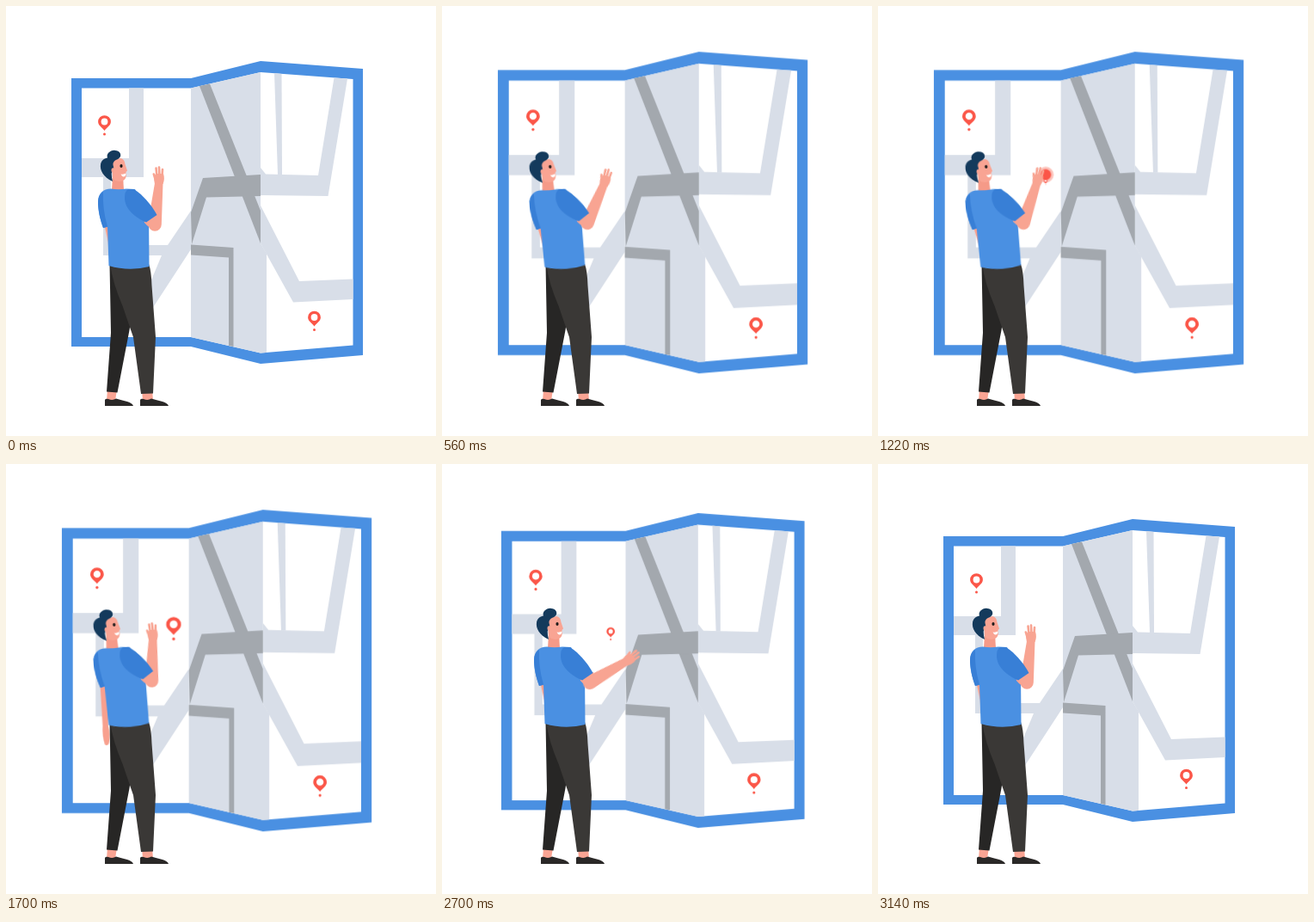
These frames come from a looping animation (500 px wide and 500 px high, 3200 ms). An HTML page:

```html
<!DOCTYPE html>
<html lang="en">
<head>
<meta charset="utf-8">
<title>Map pins</title>
<style>
  html, body { margin: 0; width: 100%; height: 100%; overflow: hidden; background: #fff; }
  svg { display: block; width: 100vw; height: 100vh; }

  /* one loop = 3200 ms, so 1% = 32 ms */
  .map, .lean, .arm, .back-arm, .eye, .halo, .disc, .drop {
    animation: 3200ms ease-in-out infinite;
  }
  .map { animation-name: zoom; transform-origin: 253px 236px; }
  .lean { animation-name: lean; transform-origin: 143px 305px; }
  .arm { animation-name: reach; transform-origin: 172px 253px; }
  .back-arm { animation-name: swing; transform-origin: 117px 248px; }
  .eye { animation-name: blink; transform-origin: 134px 186px; }
  .halo { animation-name: halo; transform-origin: 198.4px 198.4px; }
  .disc { animation-name: disc; transform-origin: 198.4px 198.4px; }
  .drop { animation-name: drop; transform-origin: 198.3px 205.3px; }

  @keyframes zoom {
    0%, 5% { transform: scale(1); }
    12.5%, 82.2% { transform: scale(1.0625); }
    87.5%, 100% { transform: scale(1); }
  }
  @keyframes lean {
    0%, 5% { transform: rotate(0); }
    15%, 72.2% { transform: rotate(-4deg); }
    82%, 100% { transform: rotate(0); }
  }
  @keyframes reach {
    0%, 7% { transform: rotate(0); }
    17.5%, 21.25% { transform: rotate(21.5deg); }
    28.125% { transform: rotate(0); }
    34.375% { transform: rotate(24deg); animation-timing-function: ease-in; }
    38.125% { transform: rotate(17deg); animation-timing-function: ease-out; }
    47%, 55.6% { transform: rotate(0); }
    69%, 89.5% { transform: rotate(54deg); }
    98.1%, 100% { transform: rotate(0); }
  }
  @keyframes swing {
    0%, 21.25% { transform: rotate(-13deg); }
    28.125% { transform: rotate(0); }
    34.375%, 38.75% { transform: rotate(-13deg); }
    47%, 55.6% { transform: rotate(0); }
    66%, 100% { transform: rotate(-13deg); }
  }
  @keyframes blink {
    0%, 70% { transform: scaleY(1); }
    71.5%, 72.2% { transform: scaleY(.2); }
    73.8%, 100% { transform: scaleY(1); }
  }
  @keyframes halo {
    0%, 30.5% { transform: scale(0); }
    35% { transform: scale(1); }
    38.125% { transform: scale(.58); }
    40.5%, 100% { transform: scale(0); }
  }
  @keyframes disc {
    0%, 30.5% { transform: scale(0); }
    35% { transform: scale(1); }
    38.125% { transform: scale(.74); }
    40.5%, 100% { transform: scale(0); }
  }
  @keyframes drop {
    0%, 37.2% { transform: translateY(4px) scale(0); }
    38.125% { transform: translateY(4px) scale(.25); }
    43.5% { transform: scale(1.3); }
    48% { transform: scale(.95); }
    51%, 82.2% { transform: scale(1); }
    87%, 100% { transform: scale(0); }
  }
</style>
</head>
<body>
<svg viewBox="0 0 500 500">
  <defs>
    <g id="pin">
      <path fill="#fb5648" d="M0-4C-3-8-7.4-10-7.4-14.4A7.4 7.4 0 0 1 7.4-14.4C7.4-10 3-8 0-4Z"/>
      <circle cy="-14.5" r="3.9" fill="#fff"/>
      <circle r="1.5" fill="#fb5648"/>
    </g>
    <path id="shoe" fill="#2a2827" d="M115 465V458Q116 456 119 457Q124 459 128 456.500Q134 458 141 460Q147 462 148 465Z"/>
  </defs>

  <g class="map">
    <path fill="#4a90e2" d="M76 84H215L296 64L415 73V406L296 416L215 396H76Z"/>
    <path fill="#fff" d="M88 95.500H215L296 77L403.500 85V394.500L296 403.500L215 385H88Z"/>
    <!-- roads and folded panel -->
    <g fill="#d8dee8">
      <path d="M215 95.500L296 77V276L303 288V403L296 403.500L215 385Z"/>
      <path d="M143 95.500H160V199H122V278H188L215 238V283L170 352L160 340L181 290H113V199H88V177H143Z"/>
      <path d="M312 78L320.500 79L321 196H316Z"/>
      <path d="M296 188L302 195.500L363 197L381.500 83.500L397 84.500L374.500 221L296 220Z"/>
      <path d="M296 232L341 320L403.500 317.500V341L334 344.500L296 276Z"/>
    </g>
    <g fill="#a3a8ae">
      <path d="M225 93L237 90.500L296 238V276Z"/>
      <path d="M229 200L296 196V221L233 222.500L216 277L215 240Z"/>
      <path d="M215 277.500L264.500 281V396L259 395V292.500L215 289.500Z"/>
    </g>
    <use href="#pin" x="114.500" y="149"/>
    <use href="#pin" x="358.500" y="376.500"/>
    <circle class="halo" cx="198.400" cy="198.400" r="15" fill="#fcc3bb"/>
    <circle class="disc" cx="198.400" cy="198.400" r="8" fill="#fb5648"/>
    <g class="drop"><use href="#pin" transform="translate(198.300 205.300) scale(1.100)"/></g>
  </g>

  <g class="lean">
    <path class="back-arm" fill="#f8a08e" d="M113 240H121L120.500 290L119 303Q121 312 118.500 323Q116 327 113.500 324Q111 314 112.500 303Z"/>
  </g>

  <!-- legs -->
  <path fill="#f9a493" d="M118 446H129L127 459H117ZM158 446H170L171 459H159Z"/>
  <use href="#shoe"/>
  <use href="#shoe" x="41"/>
  <path fill="#272625" d="M120.500 300L122 380L117 448.500L129.500 449.500L143.500 377L150 330Z"/>
  <path fill="#3a3836" d="M121 300H166Q169 308 169.500 325L174 385L171 450.500L157 451L148 385Q142 368 136 350Q124 322 121 300Z"/>

  <g class="lean">
    <!-- neck and shirt -->
    <path fill="#f59a88" d="M124 197H136L137 214Q130 218 123 214Z"/>
    <path fill="#4a90e2" d="M122 212.500Q131 214 140 212.500L150 213L166 240L166.500 303Q143 309 119.500 302L118 257L113 258C109 247 107 238 107 228C107 218 113 212.500 122 212.500Z"/>
    <path fill="#387fd6" d="M113 216C108 219 107 224 107 230Q108 245 113 258L118 256.500Q112 236 113 216Z"/>

    <!-- head -->
    <path fill="#f9a493" d="M123 180L133 177Q138 178 138.500 184L141 191.500L139.500 193Q141 202 135 203.500Q128 205 124 201Z"/>
    <path fill="#143a5c" d="M124 204C113 199 109 191 110 184C111 179 115 177 118 176.500C116 172 122 167 127 168C132 168 134 172 133 175C131 179 127 178.500 125.500 181C123 184 126 187 125 190Q121 192 124 204Z"/>
    <ellipse cx="124.500" cy="191" rx="2" ry="2.800" fill="#f9a493"/>
    <ellipse class="eye" cx="134" cy="186" rx="1.600" ry="1.900" fill="#1c1a1a"/>
    <path fill="#fff" d="M133.500 195.500Q137 196 139.500 194.500Q139.500 198.500 136.500 198.500Q134.500 198 133.500 195.500Z"/>

    <!-- front arm -->
    <path fill="#f8a492" d="M160 246L176 242L178 257L173 260.500Q166 258 161 252Z"/>
    <g class="arm">
      <path fill="#f8a492" d="M165.500 250L173 206H182.500L180.800 254A7.500 7.500 0 0 1 165.500 254Z"/>
      <path fill="#f8a492" d="M173 207Q171 199 174 195H183Q185 201 182.500 207Z"/>
      <path fill="none" stroke="#f8a492" stroke-width="2.600" stroke-linecap="round" d="M175.500 198L174.500 188.500M178.500 198L178 187.500M181.500 198L182 190M174 203L171.800 195.500"/>
    </g>
    <path fill="#387fd6" d="M142 213H148C156 216 170 232 175.500 243L163 251.500C150 246 138 236 138 223Q138 215 142 213Z"/>
  </g>
</svg>
</body>
</html>
```
